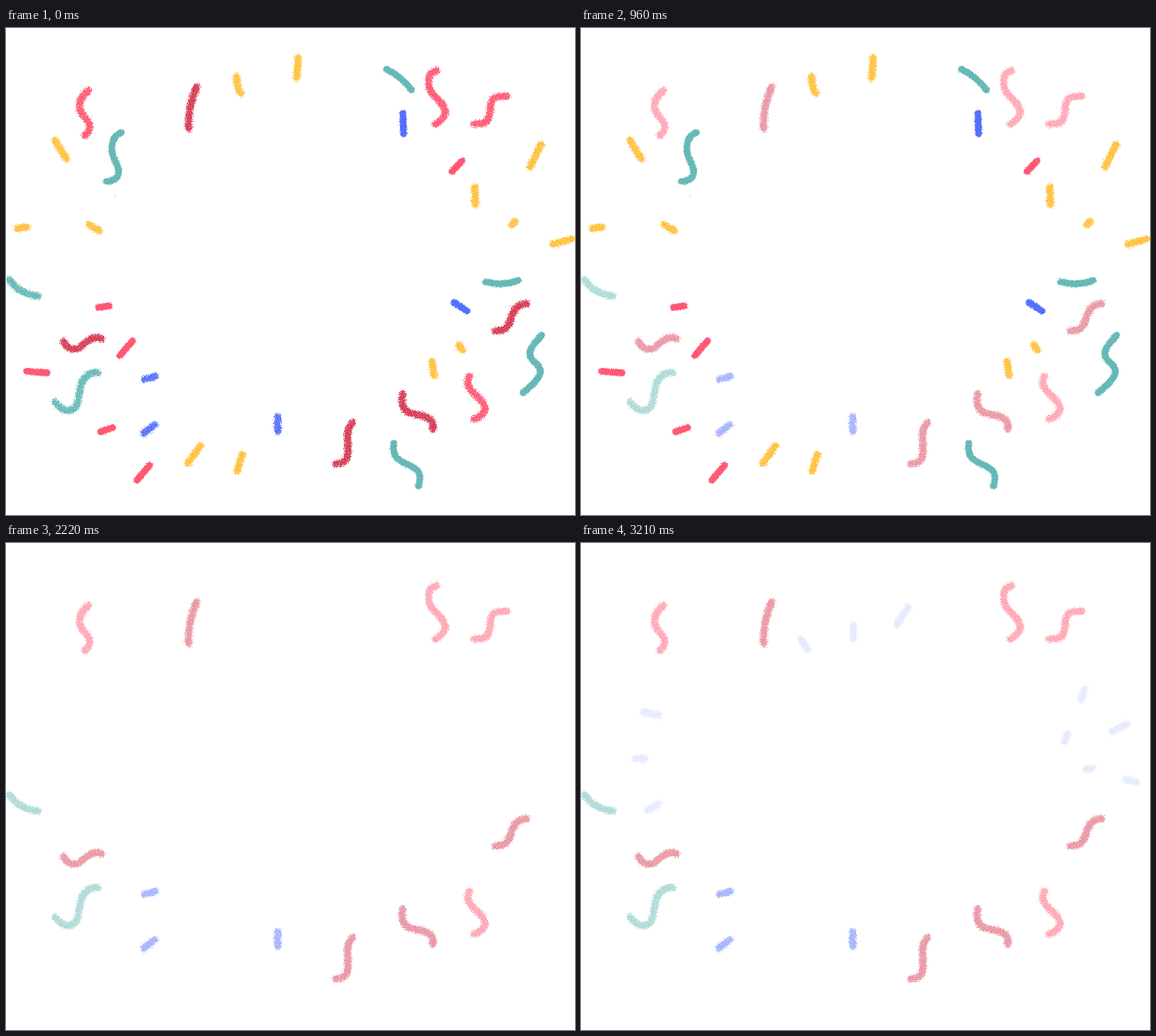
An HTML page for the animation above (3.3 s loop, 800 px wide and 685 px high).

```html
<!DOCTYPE html>
<html lang="en">
<head>
<meta charset="utf-8">
<title>Confetti</title>
<style>
  html, body { margin: 0; width: 100%; height: 100%; overflow: hidden; background: #fff; }
  svg { display: block; width: 800px; height: 685px; }
  path { fill: none; stroke-linecap: round; stroke-linejoin: round; }
  .chalk { filter: url(#chalk); stroke-width: 10; }
  .crayon { filter: url(#crayon); stroke-width: 9.5; }
  .pink { stroke: #ff5872; }
  .wine { stroke: #d63a52; }
  .teal { stroke: #66b9b6; }
  .gold { stroke: #ffc03c; }
  .blue { stroke: #5470fb; }
  .speck { stroke: #ccc; stroke-width: 1; }

  #dashes, #ribbons, #sprinkles { animation: 3300ms step-end infinite; }
  #dashes { animation-name: dashes; }
  #ribbons { animation-name: ribbons; }
  #sprinkles { animation-name: sprinkles; }

  @keyframes dashes {
    0%, 29.09%, 60.909%, 100% { opacity: 0; }
    1.818% { opacity: 1; }
    11.818%, 49.09%, 84.545% { opacity: .15; }
  }
  @keyframes ribbons {
    0%, 100% { opacity: 1; }
    12.727%, 49.09%, 84.545% { opacity: .53; }
    33.636%, 76.363% { opacity: 0; }
  }
  @keyframes sprinkles {
    0%, 14.545%, 49.09%, 71.818%, 100% { opacity: 1; }
    10.909%, 40%, 67.272%, 97.272% { opacity: 0; }
  }
</style>
</head>
<body>
<svg viewBox="0 0 800 685">
  <!-- loose grainy edge -->
  <filter id="chalk" filterUnits="userSpaceOnUse" x="0" y="0" width="800" height="685" color-interpolation-filters="sRGB">
    <feTurbulence type="fractalNoise" baseFrequency=".73" numOctaves="2" seed="4"/>
    <feColorMatrix values="1 0 0 0 0  0 1 0 0 0  0 0 1 0 0  0 0 0 0 1" result="noise"/>
    <feDisplacementMap in="SourceGraphic" in2="noise" scale="9" xChannelSelector="R" yChannelSelector="G" result="rough"/>
    <feColorMatrix in="noise" values="0 0 0 0 0  0 0 0 0 0  0 0 0 0 0  0 0 1.5 0 .25" result="mask"/>
    <feComposite in="rough" in2="mask" operator="in"/>
  </filter>
  <!-- solid body, slightly rough edge -->
  <filter id="crayon" filterUnits="userSpaceOnUse" x="0" y="0" width="800" height="685" color-interpolation-filters="sRGB">
    <feTurbulence type="fractalNoise" baseFrequency=".73" numOctaves="2" seed="4"/>
    <feColorMatrix values="1 0 0 0 0  0 1 0 0 0  0 0 1 0 0  0 0 0 0 1" result="noise"/>
    <feDisplacementMap in="SourceGraphic" in2="noise" scale="4" xChannelSelector="R" yChannelSelector="G"/>
  </filter>

  <g id="dashes">
    <g class="chalk">
      <path class="blue" d="M88 238L109 242M76 303H90M94 376L108 367M309 136L319 150M383 116V135M444 115L460 90"/>
      <path class="blue" d="M708 206L703 220M684 269L680 279M747 265L767 255M710 318L719 317M766 333L781 336"/>
    </g>
  </g>

  <g id="ribbons">
    <g class="chalk">
      <path class="pink" d="M116 88C103 98 99 112 109 123S121 142 111 151"/>
      <path class="pink" d="M605 60C592 63 590 82 602 95C616 110 628 121 604 135"/>
      <path class="pink" d="M704 96C684 95 682 101 681 112C680 130 676 136 658 135"/>
      <path class="pink" d="M652 490C646 498 650 507 661 517C677 530 679 543 658 550"/>
      <path class="wine" d="M268 83C260 102 256 115 257 141"/>
      <path class="wine" d="M81 441C86 452 98 456 108 446C118 436 126 433 134 437"/>
      <path class="wine" d="M487 555C478 565 480 575 481 587C481 604 480 612 464 613"/>
      <path class="wine" d="M558 515C555 530 558 539 570 542C592 546 603 550 600 564"/>
      <path class="wine" d="M732 388C718 388 714 396 710 409C706 421 702 427 688 426"/>
      <path class="teal" d="M5 354C12 366 24 374 45 377"/>
      <path class="teal" d="M129 485C114 483 107 494 104 508C101 530 99 537 88 538C80 538 74 533 69 526"/>
      <path class="blue" d="M195 494L210 490M194 570L209 558M382 547V567"/>
    </g>
  </g>

  <g id="sprinkles">
    <g class="chalk">
      <path class="gold" d="M324 68Q324 82 330 92M411 42L408.500 70M69 158L85 184M16 282L29 280M117 277L131 285"/>
      <path class="gold" d="M752 164L737 195M659 224L660 248M711 277L716 272M769 304L795 297"/>
      <path class="gold" d="M637 446L642 453M599 469L602 489M256 612L273 588M332 600L325 623"/>
    </g>
    <g class="crayon">
      <path class="teal" d="M162 147C149 152 147 166 150 178C154 190 160 196 158 205C156 213 150 215 141 216"/>
      <path class="teal" d="M535 58C550 65 560 74 570 87M674 357C690 361 705 361 720 355"/>
      <path class="teal" d="M753 432C738 449 731 457 741 468C757 481 756 489 727 513"/>
      <path class="teal" d="M545 584C544 600 547 606 562 613C582 621 585 628 580 644"/>
      <path class="blue" d="M558 120L559 149M630 386L648 398"/>
      <path class="pink" d="M627 202L641 187M130 393L145 391M160 461L178 440M29 483L58 485M133 568L150 562M184 636L202 615"/>
    </g>
    <path class="speck" d="M152.500 234L154 237"/>
  </g>
</svg>
</body>
</html>
```
